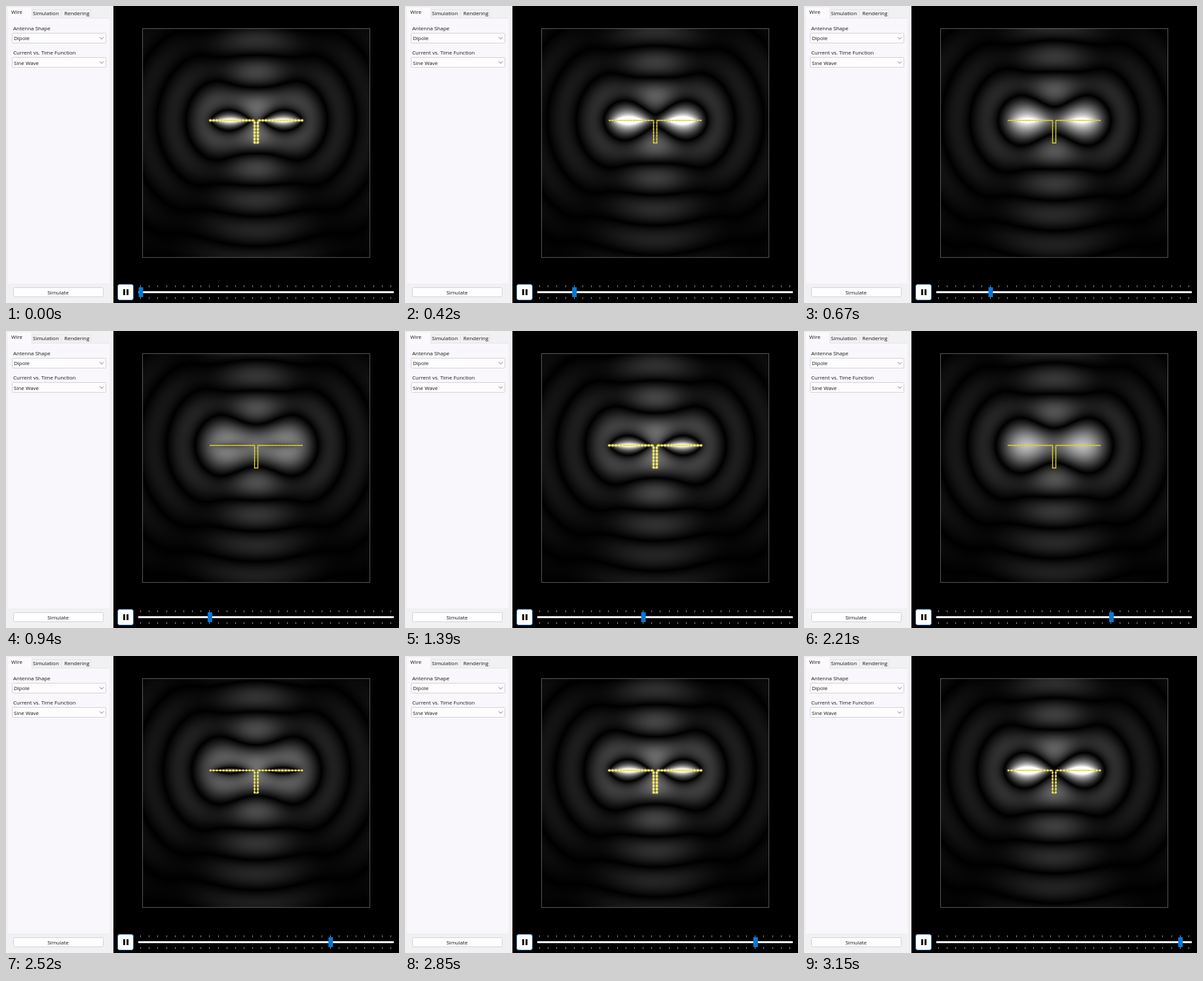
An HTML page with a canvas for the animation above (3180 ms loop, 600 by 453 pixels).

```html
<!DOCTYPE html>
<html lang="en">
<head>
<meta charset="utf-8">
<title>Antenna simulation</title>
<style>
  html, body { margin: 0; width: 100%; height: 100%; overflow: hidden; background: #000; }
  canvas, svg { position: absolute; left: 0; top: 0; }
  text { font: 8px "Open Sans", "Noto Sans", sans-serif; fill: #161616; }
</style>
</head>
<body>
<canvas id="view" width="600" height="453"></canvas>
<svg width="600" height="453" viewBox="0 0 600 453">
  <rect width="164" height="453" fill="#f1f0f2"/>
  <rect x="3" y="18" width="155" height="405" fill="#f9f7fb"/>
  <path d="M3 19V2h36v17" fill="#fbf9fc"/>
  <path d="M39.5 18V5.5h45V18M84.5 5.5h45V18M39 18.5h119" fill="none" stroke="#e6e4e7"/>
  <g fill="#fefdfe" stroke="#d4d2d6">
    <rect x="9.5" y="41.5" width="143" height="15" rx="1"/>
    <rect x="9.5" y="78.5" width="143" height="15" rx="1"/>
    <rect x="11.5" y="429.5" width="137" height="14" rx="2"/>
  </g>
  <path d="M143 47.5l3 3 3-3M143 84.5l3 3 3-3" fill="none" stroke="#777"/>
  <text x="8" y="12">Wire</text>
  <text x="41" y="14">Simulation</text>
  <text x="89" y="14">Rendering</text>
  <text x="11" y="36.5">Antenna Shape</text>
  <text x="12" y="52">Dipole</text>
  <text x="11" y="74">Current vs. Time Function</text>
  <text x="12" y="89.5">Sine Wave</text>
  <text x="79.5" y="439.5" text-anchor="middle">Simulate</text>

  <rect x="208.5" y="34.5" width="347" height="349" fill="none" stroke="#a8a8a8" stroke-dasharray="1 1"/>
  <rect x="170.5" y="424.5" width="24" height="24" rx="3" fill="#fff" stroke="#2b6cb0"/>
  <path d="M179 432h3v9h-3zM184 432h3v9h-3z" fill="#000"/>
  <path id="ticks" stroke="#858585"/>
  <rect x="202" y="435" width="390" height="3" fill="#fff"/>
  <rect id="thumb" x="202.5" y="429" width="7" height="15" fill="#0a78d6"/>
</svg>
<script>
const LOOP = 3180, HALF_PERIOD = 1410, TICK = 13.17, TICK_MS = 112.5;
const W = 348, H = 349, LEFT = 208, TOP = 34;
const FEED_X = 382, WIRE_Y = 174, ARM = 71;
const K = 2 * Math.PI / 89, GAIN = 6400;

const ctx = document.getElementById('view').getContext('2d');
const thumb = document.getElementById('thumb');
const image = ctx.createImageData(W, H);
const inPhase = new Float32Array(W * H), quadrature = new Float32Array(W * H);

document.getElementById('ticks').setAttribute('d', Array.from({ length: 30 }, (_, i) => {
  const x = Math.round(206 + i * TICK) - 0.5;
  return `M${x} 426v3M${x} 444v3`;
}).join(''));

// Current elements along both arms, normalised to a total of one.
const sources = [];
for (let s = -ARM + 1; s < ARM; s += 2) {
  sources.push({ s, current: Math.sin(Math.PI * (Math.abs(s) / ARM) ** 1.2) });
}
const total = sources.reduce((sum, e) => sum + e.current, 0);

// Retarded potential, split into its cosine and sine parts.
function solveField() {
  for (let y = 0, i = 0; y < H; y++) {
    const dy = y + TOP - WIRE_Y;
    for (let x = 0; x < W; x++, i++) {
      const dx = x + LEFT - FEED_X;
      let c = 0, q = 0;
      for (const { s, current } of sources) {
        const r = Math.sqrt((dx - s) ** 2 + dy * dy + 3);
        const a = current / r;
        c += a * Math.cos(K * r);
        q += a * Math.sin(K * r);
      }
      inPhase[i] = GAIN * c / total;
      quadrature[i] = GAIN * q / total;
    }
  }
}

function drawField(phase) {
  const c = Math.cos(phase), s = Math.sin(phase), px = image.data;
  for (let i = 0, p = 0; i < W * H; i++, p += 4) {
    px[p] = px[p + 1] = px[p + 2] = Math.abs(c * inPhase[i] + s * quadrature[i]);
    px[p + 3] = 255;
  }
  ctx.putImageData(image, LEFT, TOP);
}

function drawWire(strength) {
  const radius = 0.6 + 2.4 * Math.max(0, strength - 0.5);
  const dot = (x, y) => {
    ctx.beginPath();
    ctx.arc(x, y, radius, 0, 7);
    ctx.fill();
  };
  ctx.lineWidth = 1.4;
  ctx.strokeStyle = '#d9cc18';
  ctx.beginPath();
  ctx.moveTo(FEED_X - ARM, WIRE_Y + 0.5);
  ctx.lineTo(FEED_X - 2.5, WIRE_Y + 0.5);
  ctx.lineTo(FEED_X - 2.5, 209);
  ctx.lineTo(FEED_X + 2.5, 209);
  ctx.lineTo(FEED_X + 2.5, WIRE_Y + 0.5);
  ctx.lineTo(FEED_X + ARM, WIRE_Y + 0.5);
  ctx.stroke();
  ctx.fillStyle = '#fff06a';
  ctx.shadowColor = '#d8d0a0';
  ctx.shadowBlur = 5 * Math.max(0, strength - 0.5);
  for (const side of [-1, 1]) {
    for (let d = 5; d < ARM; d += 5) dot(FEED_X + side * d, WIRE_Y + 0.5);
    for (let y = 178; y < 210; y += 5) dot(FEED_X + side * 2.5, y);
  }
  ctx.shadowBlur = 0;
}

function draw(now) {
  const t = now % LOOP, angle = Math.PI * t / HALF_PERIOD;
  drawField(angle + K * 85);
  drawWire(Math.abs(Math.cos(angle)));
  thumb.setAttribute('x', 202.5 + TICK * Math.round(t / TICK_MS));
}

solveField();
const start = performance.now();
function frame() {
  draw(performance.now() - start);
  requestAnimationFrame(frame);
}
frame();
</script>
</body>
</html>
```
